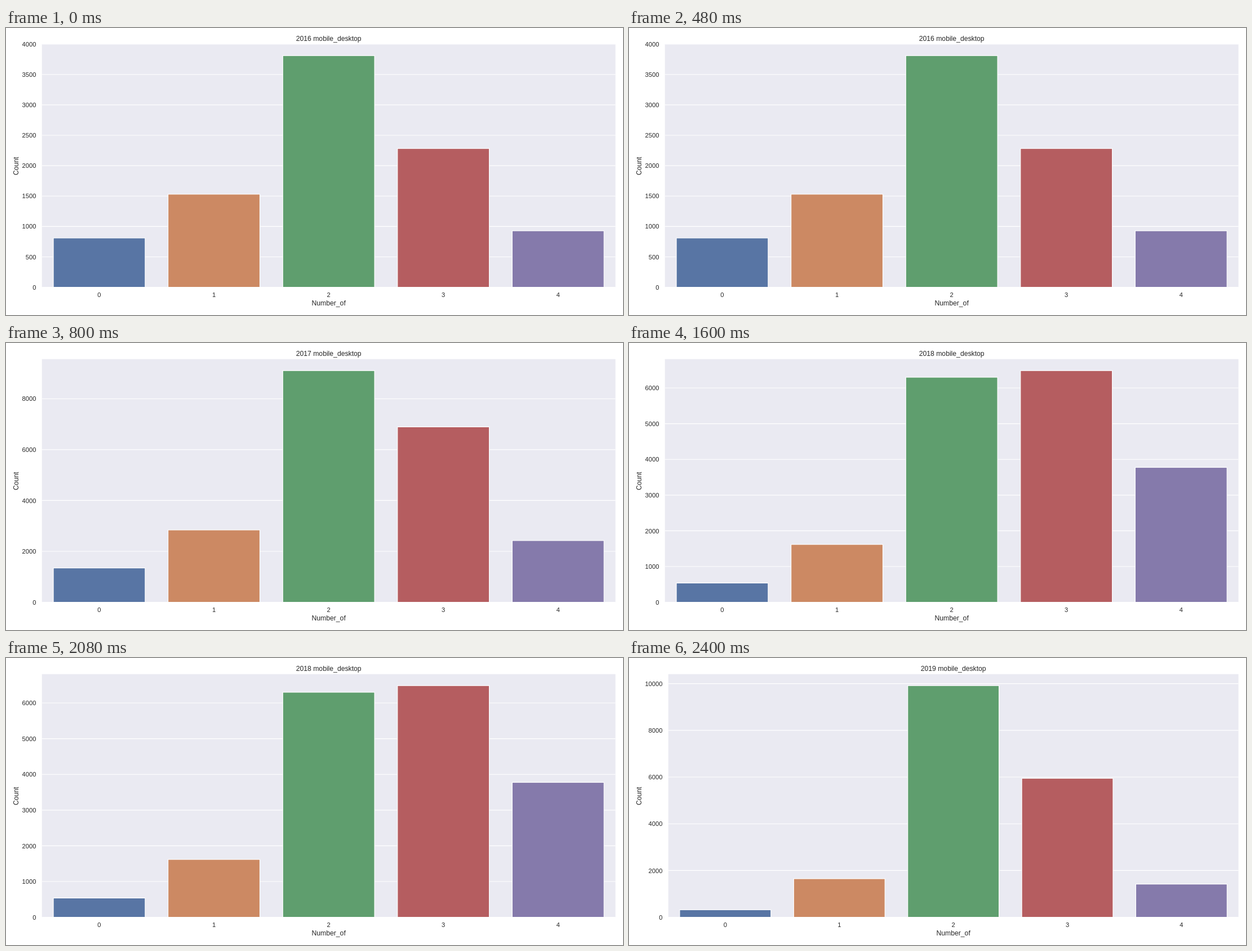
Recreate the animation shown at these times as an HTML page. Size 1095 by 511 pixels, loop 3200 ms.

```html
<!DOCTYPE html>
<html lang="en">
<head>
<meta charset="utf-8">
<title>mobile_desktop by year</title>
<style>
  html, body { margin: 0; width: 100%; height: 100%; overflow: hidden; background: #fff; }
  svg { display: block; width: 1095px; height: 511px; }
  text { font: 11.2px Arial, "Liberation Sans", sans-serif; fill: #262626; text-anchor: middle; }
  .label { font-size: 12.2px; }
  .tick { text-anchor: end; }
  .grid { stroke: #fff; stroke-width: 1.15; }
  .bar { stroke: #fff; stroke-width: 1.15; }
  .chart { visibility: hidden; animation: show 3200ms step-end infinite; }
  @keyframes show {
    0% { visibility: visible; }
    25%, 100% { visibility: hidden; }
  }
</style>
</head>
<body>
<svg id="stage" viewBox="0 0 1095 511"></svg>
<script>
const NS = "http://www.w3.org/2000/svg";
const TOP = 28.7, BOTTOM = 461.6, RIGHT = 1081.6;
const COLORS = ["#5875a4", "#cc8963", "#5f9e6e", "#b55d60", "#857aab"];

// step: tick interval, gap: its height in pixels, tops: upper edge of each bar
const charts = [
  { year: 2016, left: 63.7, step: 500, gap: 54.12, tops: [373.9, 295.9, 49.2, 214.6, 361.1] },
  { year: 2017, left: 63.7, step: 2000, gap: 90.6, tops: [400.6, 332.9, 49.2, 149.4, 351.8] },
  { year: 2018, left: 63.7, step: 1000, gap: 63.6, tops: [427.4, 358.7, 61, 49.2, 221.5] },
  { year: 2019, left: 69.7, step: 2000, gap: 83.2, tops: [448.3, 393, 49.2, 214.2, 402.6] }
];

function add(parent, tag, attrs, text) {
  const el = document.createElementNS(NS, tag);
  for (const key in attrs) el.setAttribute(key, attrs[key]);
  if (text !== undefined) el.textContent = text;
  parent.appendChild(el);
  return el;
}

function drawChart({ year, left, step, gap, tops }, index) {
  const g = add(document.getElementById("stage"), "g", { class: "chart" });
  g.style.animationDelay = `${index * 800 - (index ? 3200 : 0)}ms`;
  const width = RIGHT - left, slot = width / tops.length, mid = left + width / 2;

  add(g, "rect", { x: left, y: TOP, width, height: BOTTOM - TOP, fill: "#eaeaf2" });
  for (let i = 0; BOTTOM - i * gap > TOP - 1; i++) {
    const y = BOTTOM - i * gap;
    add(g, "line", { class: "grid", x1: left, x2: RIGHT, y1: y, y2: y });
    add(g, "text", { class: "tick", x: left - 10.2, y: y + 4.1 }, i * step);
  }
  tops.forEach((y, i) => {
    add(g, "rect", {
      class: "bar", x: left + slot * (i + 0.1), y,
      width: slot * 0.8, height: BOTTOM - y, fill: COLORS[i]
    });
    add(g, "text", { x: left + slot * (i + 0.5), y: 479.1 }, i);
  });

  add(g, "text", { class: "label", x: mid, y: 22.5 }, `${year} mobile_desktop`);
  add(g, "text", { class: "label", x: mid, y: 494 }, "Number_of");
  add(g, "text", { class: "label", transform: "translate(22.4 245.8) rotate(-90)" }, "Count");
}

charts.forEach(drawChart);
</script>
</body>
</html>
```
